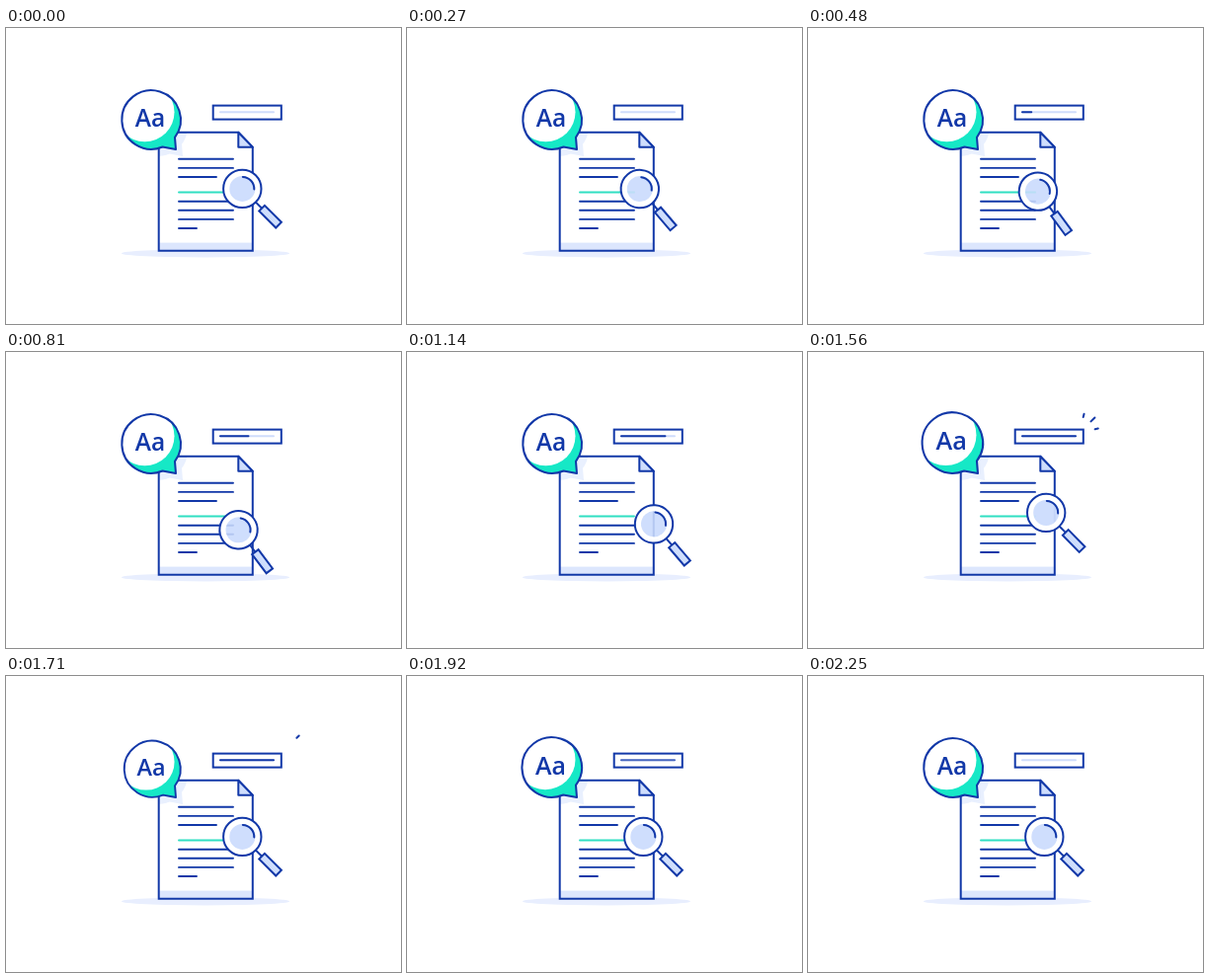
An HTML page that plays this animation: 400x300 px, repeating every 2.7 s.

```html
<!DOCTYPE html>
<html lang="en">
<head>
<meta charset="utf-8">
<title>Document review</title>
<style>
  html, body { margin: 0; width: 100%; height: 100%; overflow: hidden; background: #fff; }
  svg { display: block; width: 100vw; height: 100vh; }
  .ink { stroke: #1238a8; stroke-width: 2; }
  .line { fill: none; stroke-linecap: round; }
  text { font: 600 24.5px "Open Sans", "Noto Sans", sans-serif; fill: #1238a8; }
</style>
</head>
<body>
<svg viewBox="0 0 400 300">
  <defs>
    <path id="page" d="M154.700 105.800H235.300L249.800 120.800V225.800H154.700Z"/>
    <path id="balloon" d="M171 110.800L172 123L158.500 120.500A29.800 29.800 0 1 1 171 110.800Z"/>
    <clipPath id="inPage"><use href="#page"/></clipPath>
    <clipPath id="inBalloon"><use href="#balloon"/></clipPath>
    <clipPath id="inLens"><circle id="lensClip" r="13"/></clipPath>
    <g id="rows" class="line" stroke-width="1.900">
      <path stroke="#1238a8" d="M175 132.800h55m-55 9.100h55m-55 9.100h38M175 175.700h55m-55 9.100h55m-55 9.100h55m-55 9.100h18"/>
      <path stroke="#2fdfc2" d="M175 166.500h55"/>
    </g>
  </defs>

  <ellipse cx="202" cy="228.400" rx="85" ry="4" fill="#e8eefe"/>

  <use href="#page" fill="#fff"/>
  <g clip-path="url(#inPage)">
    <rect x="155" y="217.600" width="95" height="9" fill="#dce6fd"/>
    <use href="#balloon" x="7" y="7" fill="#e9f0fe"/>
  </g>
  <use href="#page" class="ink" fill="none"/>
  <path class="ink" fill="#cfdefd" stroke-linejoin="round" d="M235.300 105.800V120.800H249.800Z"/>
  <use href="#rows"/>

  <rect class="ink" x="209.700" y="78.600" width="69.100" height="14" fill="#fff"/>
  <path class="line" stroke="#cfdcfb" stroke-width="2" d="M217 85.200H271"/>
  <path id="bar" class="ink line"/>
  <g id="sparks" class="ink line"></g>

  <g id="bubble">
    <use href="#balloon" fill="#16e8c6"/>
    <circle cx="140.500" cy="85.300" r="30" fill="#fff" clip-path="url(#inBalloon)"/>
    <use href="#balloon" class="ink" fill="none" stroke-linejoin="round"/>
    <text x="146" y="99.900" text-anchor="middle">Aa</text>
  </g>

  <g id="glass">
    <path class="ink" d="M19 0H28"/>
    <rect class="ink" x="28" y="-4" width="24" height="8" fill="#cfdefd"/>
    <circle class="ink" r="19.200" fill="#fff"/>
    <circle r="13" fill="#cfdefd"/>
  </g>
  <g id="seen" clip-path="url(#inLens)">
    <use href="#rows"/>
    <use href="#page" class="ink" fill="none"/>
  </g>
  <path id="glare" class="ink line" d="M.5 -12A12 12 0 0 1 12 .5"/>
</svg>

<script>
const LOOP = 2700;
const $ = id => document.getElementById(id);
const clamp = v => Math.min(1, Math.max(0, v));
const ramp = (t, a, b) => clamp((t - a) / (b - a));

// Key points of the glass: time, x, y, turn
const HOME = [239.3, 162.9, 0];
const ROUTE = [
  [0, ...HOME], [480, 232.9, 165.6, 8.6], [810, 235.5, 180.3, 8],
  [1140, 250, 174.4, 4.5], [1410, 244.5, 164.4, 1.8], [1710, ...HOME]
];

// Smooth curve through the key points, at rest on both ends
function along(keys, t) {
  const last = keys.length - 1;
  if (t >= keys[last][0]) return keys[last].slice(1);
  const i = keys.findIndex(k => k[0] > t) - 1;
  const a = keys[i], b = keys[i + 1];
  const span = b[0] - a[0], u = (t - a[0]) / span, w = 1 - u;
  const slope = (j, k) => j === 0 || j === last ? 0
    : (keys[j + 1][k] - keys[j - 1][k]) / (keys[j + 1][0] - keys[j - 1][0]);
  return [1, 2, 3].map(k =>
    a[k] * (1 + 2 * u) * w * w + b[k] * u * u * (3 - 2 * u)
    + span * u * w * (slope(i, k) * w - slope(i + 1, k) * u));
}

function moveGlass(t) {
  const [x, y, turn] = along(ROUTE, t);
  const place = `translate(${x} ${y})`;
  $("glass").setAttribute("transform", `${place} rotate(${45 + turn})`);
  $("glare").setAttribute("transform", `${place} rotate(${turn})`);
  $("lensClip").setAttribute("cx", x);
  $("lensClip").setAttribute("cy", y);
  $("seen").setAttribute("opacity", 0.14 * ramp(t, 0, 300) * (1 - ramp(t, 1350, 1680)));
}

function fillBar(t) {
  const u = ramp(t, 340, 1380);
  $("bar").setAttribute("d", u ? `M217 85.2h${54 * u * (1.3 - 0.3 * u)}` : "");
  $("bar").setAttribute("opacity", 1 - ramp(t, 1800, 2230));
}

// Damped bounce about the tip of the tail
function popBubble(t) {
  const s = Math.max(0, t - 1370);
  const size = 1 + 0.23 * Math.exp(-s / 210) * Math.sin(Math.PI * s / 215);
  $("bubble").setAttribute("transform", `translate(172 122) scale(${size}) translate(-172 -122)`);
}

const sparks = [-1, 0, 1].map(side => {
  const el = document.createElementNS("http://www.w3.org/2000/svg", "path");
  $("sparks").append(el);
  el.setAttribute("transform", `translate(274.4 82) rotate(${side * 31 - 44})`);
  return { el, reach: side ? 13 : 22, time: side ? 270 : 375 };
});

function throwSparks(t) {
  for (const { el, reach, time } of sparks) {
    const u = ramp(t, 1380, 1380 + time);
    const tip = reach * clamp(u * 1.25), tail = reach * clamp(u * 1.25 - 0.25);
    el.setAttribute("d", u > 0 && u < 1 ? `M${9 + tail} 0H${9 + tip}` : "");
    el.setAttribute("opacity", clamp(u * 4));
  }
}

const begin = performance.now();
function tick() {
  const t = (performance.now() - begin) % LOOP;
  for (const part of [moveGlass, fillBar, popBubble, throwSparks]) part(t);
  requestAnimationFrame(tick);
}
tick();
</script>
</body>
</html>
```
